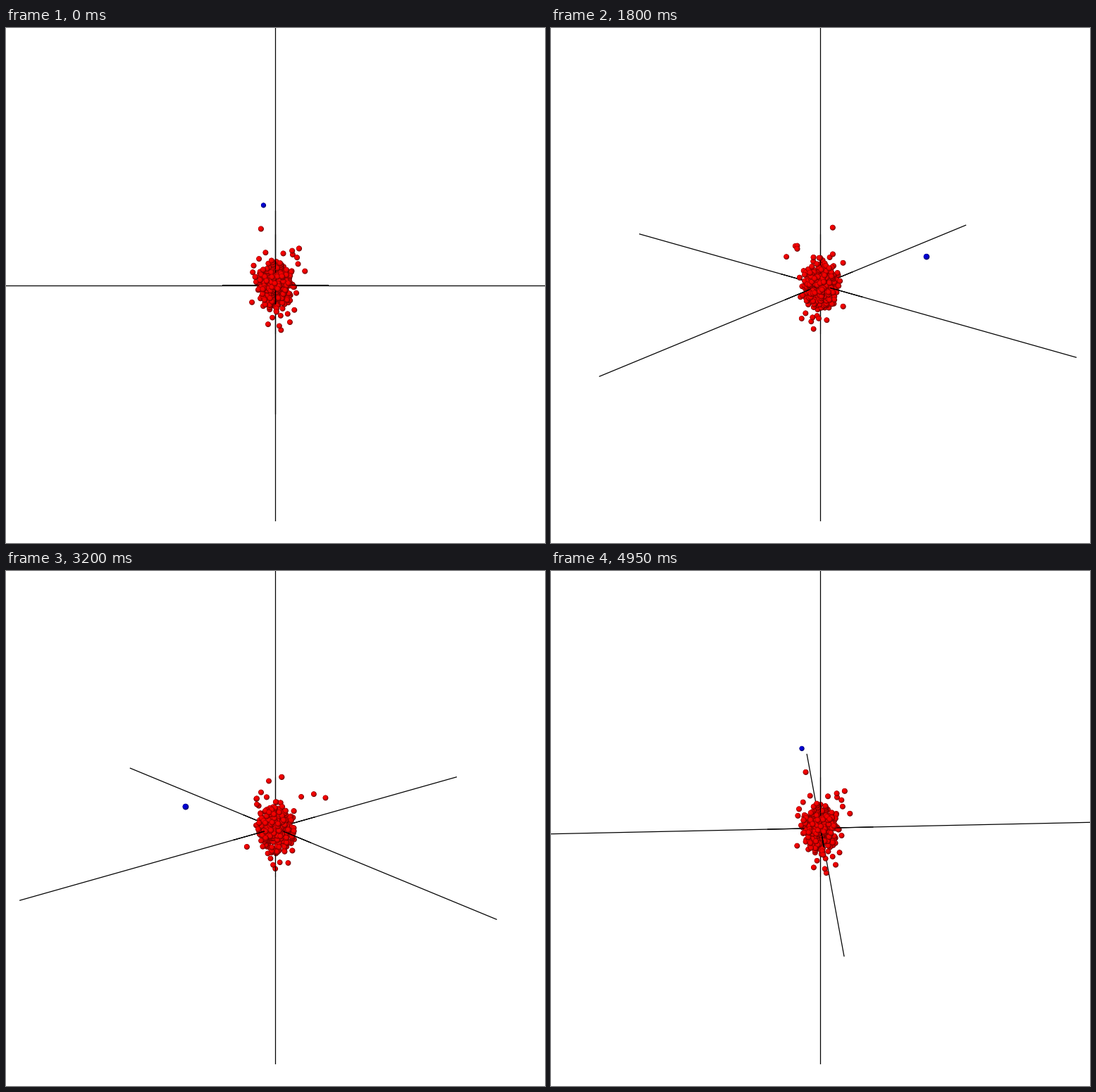
Write a matplotlib script that moves like this. It is 765 by 732 pixels and loops after 5 s.

```python
import math
import numpy as np
import matplotlib.pyplot as plt
from matplotlib.animation import FuncAnimation

W, H = 765, 732
CX, CY = 382.5, 365.5
FRAMES = 100
DPI = 100

FOCAL = (H / 2) / math.tan(math.radians(15))   # 30 degree view angle
AXIS = FOCAL / 3.5                             # half length of each axis
TILT = math.radians(20)
BALL = 3.95

BLUE = (-18.6, 72.4, -164.3)

# Points that stand clear of the cluster
LOOSE = [
    (-20.2, 81.6, -5.6), (-27, 37.3, 70.5), (-16.5, 43, 57.4), (9, 32.9, 56),
    (32.7, 59.3, 14.7), (41.5, 22, 3), (6.7, -19, -46.5), (-33.5, -25, 3),
    (1.5, -26.5, 36.5), (8, -66.6, 6.3), (5.5, -57.5, 12.8),
    (20.5, -49.5, 18), (-10.5, -54, 15), (23.5, 49, -7), (24.5, 41, -14),
    (30.5, 38, -10), (-14, 45, -11), (-23.5, 32, -22), (11, 45, -7),
    (-32, 20, 2), (-30.5, 32, 8), (32, 29, -8), (27, -36, 5),
    (17.5, -44, 0), (29.5, -9, 8), (7.5, -48, -3), (-4.5, -53, -8),
    (-1, 6, -32), (4, -8, 31),
]


def make_cluster(count=400):
    rng = np.random.default_rng(7)
    pts = rng.normal(0, (13, 19, 13), (1200, 3))
    inside = ((pts / (29, 40, 28)) ** 2).sum(axis=1) < 1
    return pts[inside][:count]


def rotate(pts, angle):
    x, y, z = pts.T
    c, s = math.cos(angle), math.sin(angle)
    return x * c - z * s, y, z * c + x * s


def project(pts, angle):
    """Screen x, screen y and scale of each point."""
    x, y, z = rotate(pts, angle)
    c, s = math.cos(TILT), math.sin(TILT)
    scale = FOCAL / (FOCAL - z * c - y * s)
    return CX + x * scale, CY - (y * c - z * s) * scale, scale


# Every ball is three stacked discs: offset x, offset y, size, shade
LAYERS = [(0, 0, 1, 0.42), (-0.09, -0.1, 0.87, 0.8), (-0.18, -0.2, 0.6, 0.96)]

balls = np.vstack([make_cluster(), LOOSE, [BLUE]])
hues = np.tile((1.0, 0.0, 0.0), (len(balls), 1))
hues[-1] = (0, 0, 0.88)

# Inner part of the axes as fine dots, so that balls can hide them
steps = np.arange(-75, 75.1, 0.6)
dots = np.vstack([np.outer(steps, unit) for unit in np.eye(3)])

points = np.vstack([balls, dots])
nb, nd = len(balls), len(dots)
owner = np.concatenate([np.repeat(np.arange(nb), 3), nb + np.arange(nd)])
layer = np.vstack([np.tile(LAYERS, (nb, 1)), np.tile((0, 0, 1, 0), (nd, 1))])
radius = np.concatenate([np.full(3 * nb, BALL), np.full(nd, 0.6)])
colors = np.vstack([np.repeat(hues, 3, axis=0), np.zeros((nd, 3))])
colors = colors * layer[:, 3:4]

fig = plt.figure(figsize=(W / DPI, H / DPI), dpi=DPI, facecolor="white")
ax = fig.add_axes([0, 0, 1, 1])
ax.set_xlim(0, W)
ax.set_ylim(H, 0)
ax.axis("off")

lines = [ax.plot([], [], color="black", lw=1.25 * 72 / DPI, zorder=1)[0]
         for _ in range(3)]
discs = ax.scatter(np.zeros(len(owner)), np.zeros(len(owner)),
                   linewidths=0, zorder=2)


def draw(frame):
    angle = 2 * math.pi * frame / FRAMES
    for line, unit in zip(lines, np.eye(3)):
        sx, sy, _ = project(np.outer((-AXIS, AXIS), unit), angle)
        line.set_data(sx, sy)

    sx, sy, scale = project(points, angle)
    order = np.argsort(scale[owner], kind="stable")
    idx, lay = owner[order], layer[order]
    size = radius[order] * scale[idx]
    discs.set_offsets(np.column_stack([sx[idx] + lay[:, 0] * size,
                                       sy[idx] + lay[:, 1] * size]))
    discs.set_sizes((2 * size * lay[:, 2] * 72 / DPI) ** 2)
    discs.set_facecolor(colors[order])
    return [*lines, discs]


anim = FuncAnimation(fig, draw, frames=FRAMES, interval=50,
                     repeat=True, repeat_delay=0, init_func=lambda: draw(0))
plt.show()
```
